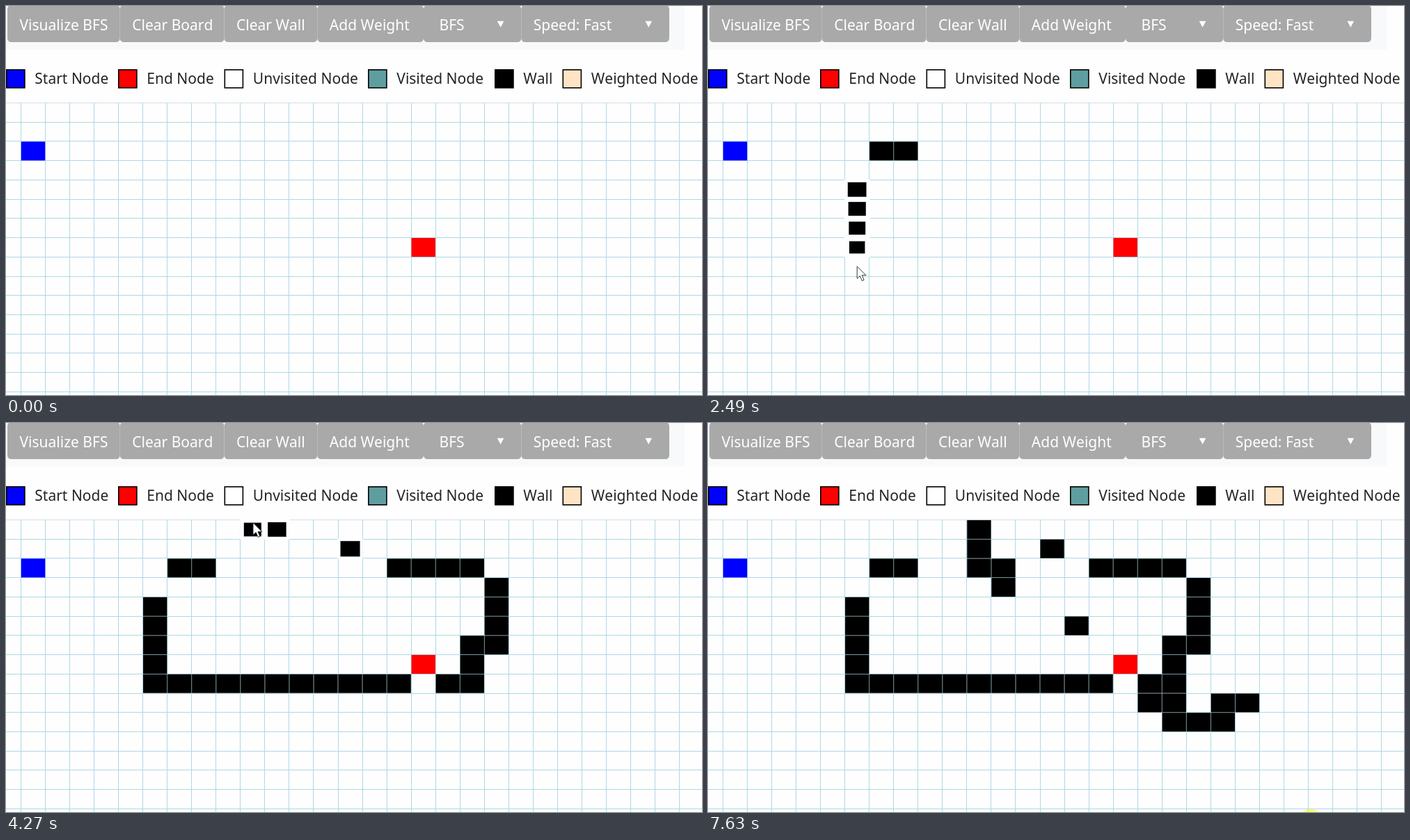
An HTML page for the animation above (7720 ms loop, 1000 by 560 pixels).

```html
<!DOCTYPE html>
<html lang="en">
<head>
<meta charset="utf-8">
<title>Path finding board</title>
<style>
  html, body { margin: 0; width: 100%; height: 100%; overflow: hidden; background: #fefefe; }
  svg { display: block; width: 1000px; height: 560px; }
  text { font: 21px "Noto Sans", "Open Sans", sans-serif; font-kerning: none; white-space: pre; }
</style>
</head>
<body>
<svg id="stage" viewBox="0 0 1000 560"></svg>
<script>
const LOOP = 7720, STEP = 77.65, GROW = 580, LEAD = 45;
const CELL_W = 35.04, CELL_H = 27.73, LEFT = 21.5, TOP = 139.5;
const stage = document.getElementById('stage');

function add(tag, attrs, parent = stage) {
  const el = document.createElementNS('http://www.w3.org/2000/svg', tag);
  for (const key in attrs) el.setAttribute(key, attrs[key]);
  return parent.appendChild(el);
}
const rect = (x, y, width, height, fill, more, parent) =>
  add('rect', { x, y, width, height, fill, ...more }, parent);
const label = (x, y, str, fill) => { add('text', { x, y, fill }).textContent = str; };
const show = (el, on) => el.setAttribute('visibility', on ? 'visible' : 'hidden');

// Toolbar
rect(0, 0, 975, 62.5, '#f8f9fa');
const buttons = [
  ['Visualize BFS', 161.7], ['Clear Board', 149.8], ['Clear Wall', 133.8],
  ['Add Weight', 152.7], ['BFS ▼', 140.3], ['Speed: Fast ▼', 212.7]
];
let left = 2;
for (const [str, width] of buttons) {
  const [name, menu] = str.split(' ▼');
  rect(left, -1, width, 53, '#a9a9a9', { rx: 5.5 });
  label(left + (name === 'BFS' ? 22.5 : 17.5), 35, name, '#fff');
  left += width;
  if (menu === '') add('path', { d: `M${left - 34.5} 21.8h9.6l-4.8 9z`, fill: '#fff' });
}

// Legend
const legend = [
  [0, 'blue', 'Start Node'], [161, 'red', 'End Node'], [313.5, '#fff', 'Unvisited Node'],
  [520, '#5f9ea0', 'Visited Node'], [702, '#000', 'Wall'], [799.5, '#ffe4c4', 'Weighted Node']
];
for (const [x, fill, str] of legend) {
  rect(x + 0.8, 91.8, 26.1, 26, fill, { stroke: '#000', 'stroke-width': 1.6 });
  label(x + 41.3, 112, str, '#212529');
}

// Board
const cellX = c => LEFT + c * CELL_W, cellY = r => TOP + r * CELL_H;
let lines = '';
for (let c = 0; c < 28; c++) lines += `M${cellX(c)} ${TOP}V560`;
for (let r = 1; r < 16; r++) lines += `M0 ${cellY(r)}H1000`;
add('path', { d: lines, stroke: '#add8e6', 'shape-rendering': 'crispEdges' });
add('path', { d: `M0 ${TOP}H1000`, stroke: '#d5dfe3' });

const fillCell = (c, r, fill) =>
  rect(cellX(c) + 0.3, cellY(r) + 0.3, CELL_W - 0.6, CELL_H - 0.6, fill);
fillCell(0, 2, 'blue');
fillCell(16, 7, 'red');

// Pen strokes: start, time per cell, column, row, moves.
// A small letter passes a cell by; a cell drawn twice is cleared.
const strokes = [
  [1680, 60, 6, 2, 'R'],
  [2205, 57, 5, 4, 'DDD'],
  [2535, 38, 5, 8, 'RRRRRRRRRRrRR'],
  [3140, 52, 18, 7, 'URUUUuLLLL'],
  [3930, 65, 13, 1, 'lluLL'],
  [4400, 0, 9, 0, ''],
  [4570, 60, 10, 1, 'DRD'],
  [4890, 0, 14, 5, ''],
  [5190, 0, 17, 9, ''],
  [5510, 40, 18, 9, 'DRRUR']
];
const moves = { R: [1, 0], L: [-1, 0], U: [0, -1], D: [0, 1] };

// Resting places and turns of the pointer outside the strokes: time, x, y
const trail = [
  [300, 559, 442], [540, 225, 378], [770, 225, 378], [930, 179, 394], [1160, 179, 394],
  [1250, 196, 342], [1480, 238, 206], [1890, 457, 225], [4270, 355, 143],
  [5830, 785, 409], [6130, 813, 447], [6300, 804, 450], [6640, 804, 451], [7080, 866, 572]
];
const blanks = add('g', {}), blocks = add('g', {});
const walls = [];

function paint(c, r, t) {
  const x = cellX(c) + CELL_W / 2, y = cellY(r) + CELL_H / 2;
  trail.push([t - LEAD, x, y]);
  const old = walls.find(w => w.x === x && w.y === y);
  if (old) { old.end = t; return; }
  const box = (pad, fill, parent, more) => rect(-CELL_W / 2 - pad, -CELL_H / 2 - pad,
    CELL_W + 2 * pad, CELL_H + 2 * pad, fill, more, parent);
  walls.push({
    x, y, start: t, end: LOOP,
    blank: box(0.7, '#fefefe', blanks, { transform: `translate(${x} ${y})` }),
    block: box(-0.35, '#000', blocks, { stroke: '#add8e6', 'stroke-width': 0.4 })
  });
}
for (let [t, gap, c, r, path] of strokes) {
  paint(c, r, t);
  for (const move of path) {
    const [dc, dr] = moves[move.toUpperCase()];
    c += dc;
    r += dr;
    if (moves[move]) paint(c, r, t += gap);
  }
}
trail.sort((a, b) => a[0] - b[0]);

// Pointer
const halo = add('circle', { r: 16.2, fill: '#ff0', opacity: 0.55 });
const ban = add('path', {
  d: 'M-10 0a10 10 0 1 0 20 0a10 10 0 1 0 -20 0M-7 -7L7 7',
  fill: 'none', stroke: '#3c3c08', 'stroke-width': 2.4
});
const arrow = add('path', {
  d: 'M0 .5V18L4.2 14.3L7.1 21.3L9.9 20.1L7 13.3H12.8Z',
  fill: '#fff', stroke: '#222', 'stroke-width': 0.9
});

function pointerAt(t) {
  const i = trail.findIndex(p => p[0] > t);
  if (i < 1) return trail[i < 0 ? trail.length - 1 : 0].slice(1);
  const [t0, x0, y0] = trail[i - 1], [t1, x1, y1] = trail[i];
  const k = (t - t0) / (t1 - t0);
  return [x0 + (x1 - x0) * k, y0 + (y1 - y0) * k];
}

function draw(time) {
  const t = Math.floor((time + 8) / STEP) * STEP;   // screen refresh rate
  for (const w of walls) {
    const on = t >= w.start && t < w.end;
    const k = Math.min(1, (t - w.start) / GROW);
    show(w.block, on);
    show(w.blank, on && k < 1);
    if (!on) continue;
    w.block.setAttribute('stroke-opacity', k < 1 ? 1 : 0);
    w.block.setAttribute('transform', `translate(${w.x} ${w.y}) scale(${0.58 + 0.42 * k})`);
  }
  const [x, y] = pointerAt(t);
  const pressed = t >= 1080 && t < 1500, banned = pressed && t > 1200;
  for (const el of [halo, ban, arrow]) el.setAttribute('transform', `translate(${x} ${y})`);
  show(halo, pressed || t >= 7600);
  show(ban, banned);
  show(arrow, t >= 300 && !banned);
}

const begin = performance.now();
function tick() {
  draw((performance.now() - begin) % LOOP);
  requestAnimationFrame(tick);
}
tick();
</script>
</body>
</html>
```
